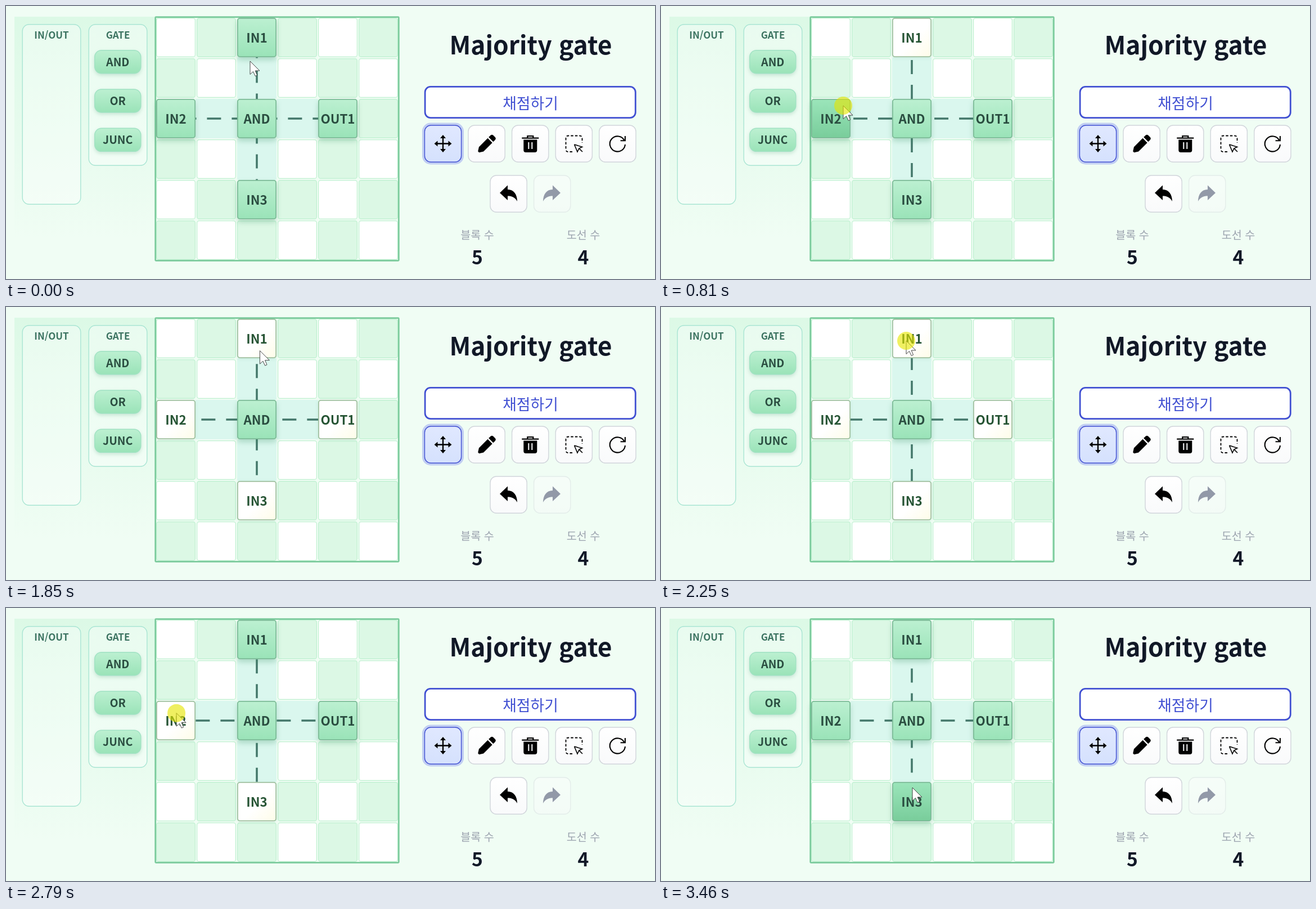
Write an HTML page that moves like this. It is 1154x485 px and loops after 3490 ms.

```html
<!DOCTYPE html>
<html lang="ko">
<head>
<meta charset="utf-8">
<title>Majority gate</title>
<style>
  html, body { margin: 0; width: 100%; height: 100%; overflow: hidden; background: #f0fdf4; }
  svg { display: block; }
  text { font-family: "Noto Sans CJK KR", "Noto Sans CJK JP", "Noto Sans CJK SC", "Noto Sans", sans-serif; text-anchor: middle; }
  .block { filter: drop-shadow(0 5px 5px rgba(50, 140, 95, .28)); }
  .block.lit { filter: drop-shadow(0 1px 3px rgba(50, 140, 95, .12)); }
  .chip { filter: drop-shadow(0 3px 3px rgba(50, 140, 95, .2)); }
</style>
</head>
<body>
<svg width="1154" height="485" xmlns="http://www.w3.org/2000/svg">
  <defs id="defs"></defs>
  <g id="panel"></g>
  <g id="board"></g>
  <g id="wires" fill="none" stroke="#43776a" stroke-width="3.5" stroke-dasharray="25 19"></g>
  <g id="blocks"></g>
  <g id="side"></g>
  <g id="move" transform="translate(777 244.5)"></g>
  <path transform="translate(854.5 245) rotate(-45) scale(.96)" d="M-14-6H9V6H-14L-21 1.5V-1.5ZM11.5-6H16q4 0 4 4v4q0 4-4 4H11.5Z"/>
  <g transform="translate(932.3 245)">
    <path d="M-12-7.5H12V11q0 4-4 4H-8q-4 0-4-4ZM-4-3V9H-2V-3ZM2-3V9H4V-3Z" fill-rule="evenodd"/>
    <path d="M-15-10.3H15M-5-11V-14H5V-11" fill="none" stroke="#000" stroke-width="2.2"/>
  </g>
  <g transform="translate(1010 245)" fill="none" stroke="#000" stroke-width="1.8">
    <path d="M-3 14H-10q-4.5 0-4.5-4.5V-10q0-4.5 4.5-4.5H10q4.5 0 4.5 4.5V-2" stroke-dasharray="4.5 3"/>
    <path d="M.5 1L14.5 5.5 9 8 15 14M9 8L6 14 .5 1" stroke-width="1.6"/>
  </g>
  <path transform="translate(1087.3 245)" d="M12-6.500A13.600 13.600 0 1 0 13.600 1M13.600-14V-5.700H5.300" fill="none" stroke="#000" stroke-width="2.1"/>
  <path id="undo" d="M878 332L892 318.5V326C903 326 909 335 909 347 905 340 900 337.5 892 337.5V345Z"/>
  <use href="#undo" transform="translate(1864 0) scale(-1 1)" id="redo"/>
  <path id="cursor" d="M0 0V23.500L5.500 18.500 9.200 26.500 12.600 25 9.200 17H17Z" fill="#fff" stroke="#333" stroke-width=".9"/>
  <circle id="press" r="16" fill="#e6e600" fill-opacity=".62"/>
</svg>
<script>
const LOOP = 3490;
const INK = '#2a4d40', BLUE = '#4150d2', GREY = '#d1d5db';
const $ = id => document.getElementById(id);
const add = (id, markup) => $(id).insertAdjacentHTML('beforeend', markup);

const gradient = (id, from, to, tilt = 0, start = 0) =>
  `<linearGradient id="${id}" x1="0" y1="0" x2="${tilt}" y2="1"><stop offset="${start}" stop-color="${from}"/><stop offset="1" stop-color="${to}"/></linearGradient>`;
const rect = (x, y, w, h, r, fill, stroke = 'none', sw = 1.4) =>
  `<rect x="${x + sw / 2}" y="${y + sw / 2}" width="${w - sw}" height="${h - sw}" rx="${r}" fill="${fill}" stroke="${stroke}" stroke-width="${sw}"/>`;
const text = (x, y, str, size, fill, weight = 700) =>
  `<text x="${x}" y="${y}" fill="${fill}" font-size="${size}" font-weight="${weight}">${str}</text>`;

add('defs', gradient('shade', '#dcf9e6', '#f0fdf4') + gradient('off', '#bcf0d1', '#9ae3b8') +
  gradient('hover', '#9be5ba', '#79cd9b') + gradient('on', '#fff', '#fefce8', 1, .55) +
  gradient('tool', '#fff', '#f9fafb') + gradient('active', '#e0e8ff', '#d5e1fd'));

// Palette on the left
const box = (x, h, title) => rect(x, 32, 105, h, 12, 'rgba(255,255,255,.35)', '#a9e5d3') +
  text(x + 52.5, 58, title, 17, '#3c7361');
add('panel', rect(15, 19, 250, 394, 0, 'url(#shade)', 'none', 0) +
  box(28.5, 321, 'IN/OUT') + box(146.5, 252, 'GATE'));
['AND', 'OR', 'JUNC'].forEach((name, i) => {
  const y = 78 + i * 69.3;
  add('panel', `<g class="chip">${rect(157, y, 83.5, 42.5, 12, 'url(#off)', '#a0e2c3')}</g>` +
    text(198.7, y + 28.7, name, 19.6, INK));
});

// Grid of cells
const STEP = 72, CELL = 70;
const cellX = c => 267 + c * STEP, cellY = r => 21 + r * STEP;
add('board', rect(264.3, 18.3, 435.4, 435.4, 1, '#f0fdf4', '#7ccb9d', 2.8));
for (let r = 0; r < 6; r++) for (let c = 0; c < 6; c++)
  add('board', rect(cellX(c), cellY(r), CELL, CELL, 4, (r + c) % 2 ? '#dcf8e5' : '#fff', '#bdf0cf', 1.2));

// Inputs toggle on one after another, then off in the same order
const clicks = [300, 870, 1450, 2320, 2840, 3400];
const blocks = [['IN1', 0, -1], ['IN2', -1, 0], ['IN3', 0, 1], ['OUT1', 1, 0], ['AND', 0, 0]].map(([name, dx, dy], i) => {
  const x = cellX(2 + 2 * dx), y = cellY(2 + 2 * dy);
  if (i < 4) {
    const gx = 2 * Math.abs(dx), gy = 2 * Math.abs(dy);
    add('board', rect(cellX(2 + dx) - gx, cellY(2 + dy) - gy, CELL + 2 * gx, CELL + 2 * gy, 2, '#daf7ee', 'none', 0));
    const ends = [`${x + 35} ${y + 35}`, '446 200'];
    if (name === 'OUT1') ends.reverse();
    add('wires', `<path d="M${ends.join('L')}"/>`);
  }
  add('blocks', `<g class="block">${rect(x, y, CELL, CELL, 4, 'url(#off)', '#7dbb98', 1.8)}</g>` +
    text(x + 35, y + 43.5, name, 22.4, INK));
  const label = $('blocks').lastElementChild, group = label.previousElementSibling;
  return { x, y, label, group, face: group.firstElementChild, start: clicks[Math.min(i, 2)], end: i < 4 ? clicks[i % 3 + 3] : 0 };
});

// Controls on the right
add('side', text(933, 86, 'Majority gate', 44.3, '#111827') +
  rect(743.7, 142, 377, 58, 9.8, '#fff', BLUE, 2.8) +
  text(932.5, 183, '채점하기', 26.8, BLUE, 400) +
  rect(740, 207.5, 74, 74, 15, '#c1cef2', 'none', 0));
const button = (x, y, active) => rect(x, y, 66.6, 66.6, 11, `url(#${active ? 'active' : 'tool'})`, active ? BLUE : GREY);
for (let i = 0; i < 5; i++) add('side', button(743.7 + i * 77.6, 211.3, i === 0));
add('side', button(860.3, 300.3) + `<g opacity=".4">${button(937.9, 300.3)}</g>`);
$('redo').setAttribute('fill', '#9299a8');
[['블록 수', 5, 838], ['도선 수', 4, 1026.5]].forEach(([name, count, x]) =>
  add('side', text(x, 414.3, name, 19.6, '#9ca3af', 400) + text(x, 459, count, 33.6, '#111827')));
for (let a = 0; a < 360; a += 90)
  add('move', `<path d="M-15.5 0l6-5v3.8H0v2.400H-9.500V5z" transform="rotate(${a})"/>`);

// Pointer stops: time, x, y
const stops = [
  [0, 434, 98], [200, 444, 74], [400, 442, 76], [810, 324, 177], [1000, 328, 182], [1360, 432, 320], [1450, 432, 320],
  [1472, 432, 276], [2097, 432, 76], [2150, 436, 60], [2320, 436, 60], [2500, 324, 159], [2800, 303, 188], [3090, 404, 294], [3400, 447, 319], [LOOP, 447, 319]
];
const slope = (i, k) => stops[i] && stops[i + 1] ? (stops[i + 1][k] - stops[i][k]) / (stops[i + 1][0] - stops[i][0]) : 0;
const tangent = (i, k) => {
  const a = slope(i - 1, k), b = slope(i, k);
  return a * b > 0 ? 2 * a * b / (a + b) : 0;
};

function pointer(t) {
  // Two and a half turns around the middle while the output is lit
  if (t > 1472 && t < 2097) {
    const a = 2 * Math.PI * (t - 1847) / 250;
    return [432 + 108 * Math.sin(a + .08), 176 - 100 * Math.cos(a + .08)];
  }
  // Otherwise a monotone cubic between the stops
  const i = stops.findIndex(s => s[0] > t) - 1, p = stops[i], q = stops[i + 1];
  const d = q[0] - p[0], u = (t - p[0]) / d, v = 1 - u;
  return [1, 2].map(k => v * v * (1 + 2 * u) * p[k] + u * u * (3 - 2 * u) * q[k] +
    d * u * v * (v * tangent(i, k) - u * tangent(i + 1, k)));
}

function draw(t) {
  // The picture stalls briefly at 2150 ms
  const flow = t < 2150 ? t : t < 2250 ? 2150 : t - 70;
  $('wires').setAttribute('stroke-dashoffset', -(55.3 + flow * .0897));

  const [x, y] = pointer(t);
  for (const id of ['cursor', 'press']) $(id).setAttribute('transform', `translate(${x} ${y})`);
  $('press').style.display = clicks.some(c => t >= c - 90 && t < c) ? '' : 'none';

  for (const b of blocks) {
    const on = t >= b.start && t < b.end;
    const over = x >= b.x && x < b.x + CELL && y >= b.y && y < b.y + CELL;
    b.face.setAttribute('fill', `url(#${on ? 'on' : over ? 'hover' : 'off'})`);
    b.face.setAttribute('stroke', on ? '#a0c0a0' : '#7dbb98');
    b.label.setAttribute('fill', on ? '#265434' : INK);
    b.group.classList.toggle('lit', on);
  }
}

const begin = performance.now();
function tick() {
  draw((performance.now() - begin) % LOOP);
  requestAnimationFrame(tick);
}
tick();
</script>
</body>
</html>
```
